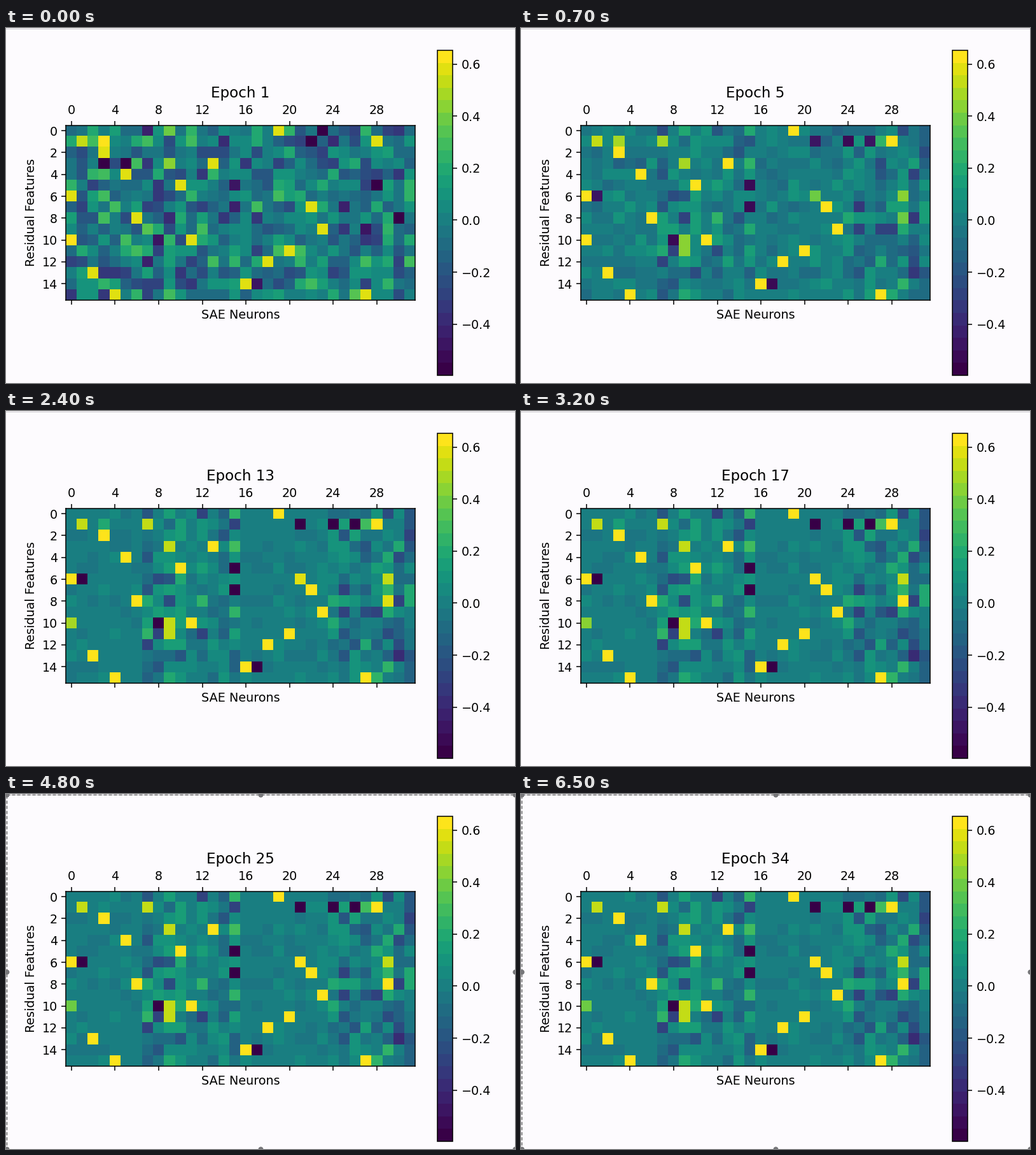
A matplotlib script that plays this animation: 800 by 557 pixels, repeating every 6.6 s.

```python
import numpy as np
import matplotlib.pyplot as plt
from matplotlib.animation import FuncAnimation
from matplotlib.colors import ListedColormap

W, H, DPI = 800, 557, 128
K = 138 / DPI  # scales the default point sizes
PX = 72 / DPI
ROWS, COLS, FRAMES = 16, 32, 66
BORDER_FROM = 39

plt.rcParams.update({
    "font.family": "DejaVu Sans",
    "font.size": 10 * K,
    "axes.linewidth": 0.8 * K,
    "axes.labelpad": 4 * K,
    "axes.titlepad": 6 * K,
})
for axis in ("xtick", "ytick"):
    plt.rcParams.update({
        f"{axis}.major.size": 3.5 * K,
        f"{axis}.major.width": 0.8 * K,
        f"{axis}.major.pad": 3.5 * K,
    })

# One neuron wins each feature; three features get a second one.
WINNERS = [19, 28, 3, 13, 5, 10, 0, 22, 6, 23, 11, 20, 18, 2, 16, 4]
PEAKS = list(enumerate(WINNERS)) + [(6, 21), (8, 29), (15, 27)]
WARM = [(1, 1), (1, 7), (3, 9), (10, 9), (11, 9), (6, 29)]
COLD = [(1, 21), (1, 24), (1, 26), (6, 1), (14, 17), (10, 8), (5, 15), (7, 15)]
EARLY_COLD = [(0, 23), (1, 22), (3, 3), (3, 5), (5, 28), (8, 30)]
SLOW = [(6, 0), (6, 21), (8, 29), (10, 0), (1, 3)]


def put(grid, cells, level):
    grid[tuple(zip(*cells))] = level


def noise(rng):
    return rng.standard_normal((ROWS, COLS)).clip(-2, 2)


rng = np.random.default_rng(12)

# Trained weights: quiet columns and two busy bands, then the strong cells.
spread = np.full(COLS, 0.025)
spread[7:16] = spread[24:] = 0.14
spread[[11, 13]] = 0.05
end = spread * noise(rng)
end[:, 30:] -= 0.08
put(end, WARM, 0.53)
put(end, COLD, -0.57)

# Initial weights: random, leaning towards the trained ones.
start = 0.6 * end + 0.16 * noise(rng) - 0.03
put(end, PEAKS, 0.72)
put(start, PEAKS, 0.57)
put(start, EARLY_COLD, -0.55)

# A few cells settle slowly.
tau = np.full((ROWS, COLS), 3.0)
put(tau, SLOW, 9)
put(start, SLOW[1:3], 0.22)
put(start, SLOW[3:], 0.75)
put(end, SLOW[3:], [0.36, 0.0])


def weights(epoch):
    return end + (start - end) * np.exp((1 - epoch) / tau)


def box(x0, y0, x1, y1):
    return [x0 / W, 1 - y1 / H, (x1 - x0) / W, (y1 - y0) / H]


# Viridis in bands, slightly darkened.
cmap = ListedColormap(plt.get_cmap("viridis", 26)(range(26))[:, :3] ** 1.15)

fig = plt.figure(figsize=(W / DPI, H / DPI), dpi=DPI, facecolor="#fdfbfe")
ax = fig.add_axes(box(94.4, 152.5, 642.5, 427))
im = ax.imshow(weights(1), cmap=cmap, vmin=-0.597, vmax=0.653,
               aspect="auto", interpolation="nearest")
ax.set_xticks(range(0, COLS, 4))
ax.set_yticks(range(0, ROWS, 2))
ax.tick_params(axis="x", top=True, labeltop=True, labelbottom=False)
ax.set_xlabel("SAE Neurons")
ax.set_ylabel("Residual Features")
title = ax.set_title("Epoch 1")
fig.colorbar(im, cax=fig.add_axes(box(677.6, 35, 702.3, 545)))

# Window edge and selection border, in pixels.
over = fig.add_axes([0, 0, 1, 1])
over.set(xlim=(0, W), ylim=(H, 0))
over.axis("off")
over.plot([0, W], [0.5, 0.5], color="#c6c5c9", lw=PX)
xs, ys = (0.5, W / 2, W - 0.5), (0.5, H / 2, H - 0.5)
border = over.plot([xs[0], xs[2], xs[2], xs[0], xs[0]],
                   [ys[0], ys[0], ys[2], ys[2], ys[0]],
                   color="#333333", lw=PX, ls=(0, (5, 3)))
grips = [(x, y) for x in xs for y in ys if (x, y) != (xs[1], ys[1])]
border += over.plot(*zip(*grips), "o", color="#77777a", ms=8 * PX, mew=0)


def update(i):
    epoch = 1 + (i + 1) // 2
    im.set_data(weights(epoch))
    title.set_text(f"Epoch {epoch}")
    for part in border:
        part.set_visible(i >= BORDER_FROM)
    return [im, title, *border]


anim = FuncAnimation(fig, update, frames=FRAMES, interval=100,
                     repeat=True, repeat_delay=0, blit=False)
plt.show()
```
